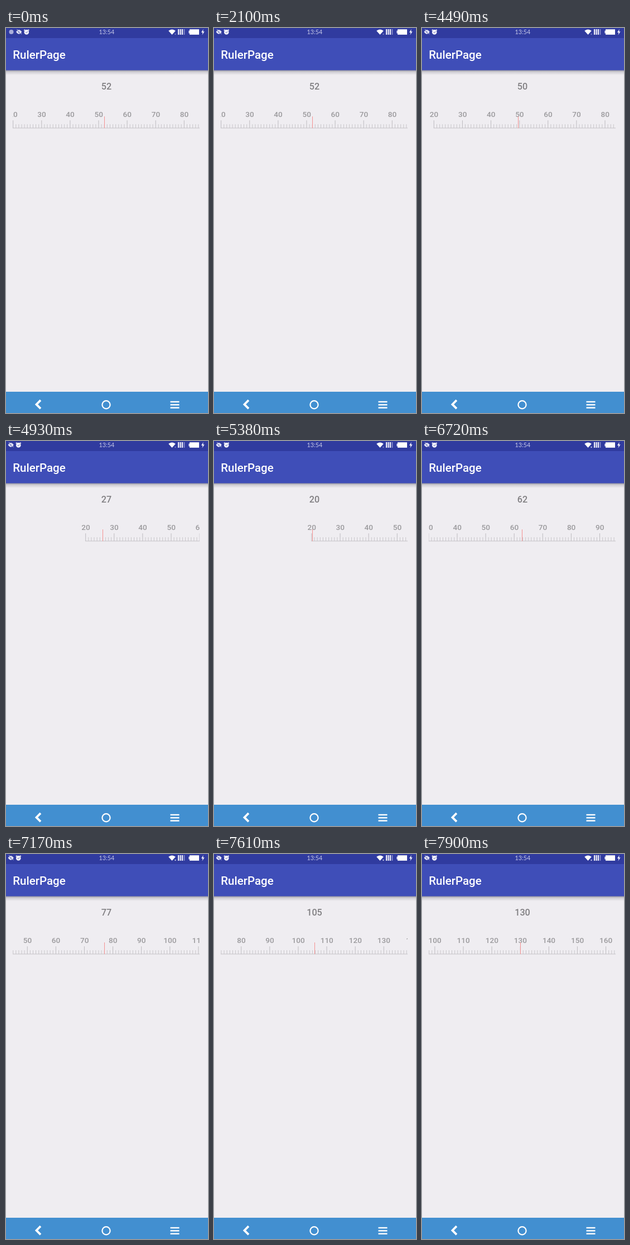
These frames come from a looping animation (362x688 px, 8000 ms). An HTML page with a canvas:

```html
<!DOCTYPE html>
<html lang="en">
<head>
<meta charset="utf-8">
<title>Ruler</title>
<style>
  html, body { margin: 0; width: 100%; height: 100%; overflow: hidden; background: #efedf1; }
  canvas { display: block; width: 362px; height: 688px; }
</style>
</head>
<body>
<canvas id="stage" width="362" height="688"></canvas>
<script>
const ctx = document.getElementById('stage').getContext('2d');
const LOOP = 8000, TICK = 146.5;
const UNIT = 5.11, CENTER = 176.2, LEFT = 12, RIGHT = 347, FIRST = 20, REST = 52;

// Swipes of the ruler, each slowing down with its own power
const SWIPES = [
  { start: 4490, span: 1100, from: 50.3, to: 20, power: 3 },
  { start: 6130, span: 1026, from: 20.9, to: 77, power: 1.57 },
  { start: 7460, span: 440, from: 84, to: 130, power: 1.5 }
];

// Scale value and pointer lead; the screen refreshes once per TICK
function pose(t) {
  const swipe = SWIPES.filter(s => t >= s.start).pop();
  if (!swipe) return { value: REST, lead: 0 };
  const { start, span, from, to, power } = swipe;
  const held = Math.floor((t - start) / TICK) * TICK;
  const left = Math.max(0, 1 - held / span) ** power;
  return {
    value: to + (from - to) * left,
    lead: Math.sign(to - from) * Math.min(4, 13 * left)
  };
}

function rect(x, y, w, h, color) {
  ctx.fillStyle = color;
  ctx.fillRect(x, y, w, h);
}

function text(str, x, y, font, color, align = 'center') {
  ctx.font = font;
  ctx.fillStyle = color;
  ctx.textAlign = align;
  ctx.fillText(str, x, y);
}

function path(points) {
  ctx.beginPath();
  points.forEach(([x, y]) => ctx.lineTo(x, y));
}

function shape(points, color) {
  path(points);
  ctx.fillStyle = color;
  ctx.fill();
}

function stroke(points, width, color) {
  path(points);
  ctx.lineWidth = width;
  ctx.strokeStyle = color;
  ctx.stroke();
}

function disc(x, y, r, color) {
  ctx.beginPath();
  ctx.arc(x, y, r, 0, 7);
  ctx.fillStyle = color;
  ctx.fill();
}

function eye(x, y) {
  ctx.beginPath();
  ctx.moveTo(x - 5, y);
  ctx.quadraticCurveTo(x, y - 7.5, x + 5, y);
  ctx.quadraticCurveTo(x, y + 7.5, x - 5, y);
  ctx.fillStyle = '#e3e4f5';
  ctx.fill();
  disc(x, y, 1.4, '#7c84c4');
  stroke([[x - 4, y - 3.6], [x + 4, y + 4.4]], .8, '#4550a6');
  stroke([[x - 3.6, y - 4.5], [x + 4.6, y + 3.7]], 1, '#eeeef9');
}

function alarm(x, y) {
  disc(x, y + .4, 4.3, '#f3f3fb');
  for (const side of [-1, 1]) {
    stroke([[x + side * 4.6, y - 2.6], [x + side * 2.6, y - 4.2]], 1.4, '#f3f3fb');
  }
  stroke([[x - 1.7, y + .4], [x - .3, y + 1.8], [x + 2, y - .8]], 1, '#5a63b2');
}

function wifi(t) {
  ctx.beginPath();
  ctx.moveTo(297.5, 12);
  ctx.lineTo(291.2, 5);
  ctx.quadraticCurveTo(297.5, 0, 303.8, 5);
  ctx.fillStyle = '#fff';
  ctx.fill();
  const busy = t >= 6130 || (t >= 1050 && t < 2100);
  shape([[302, 10.2], [305, 10.2], [303.5, 12.4]], busy ? '#ecedf8' : '#8d93cb');
}

function statusBar(t) {
  rect(0, 0, 362, 18, '#303b9f');
  const shift = t < 2100 ? 14.5 : 0;
  if (shift) disc(9.5, 7, 4, '#a9aeda');
  eye(8.7 + shift, 7);
  alarm(22.3 + shift, 7);
  text('13:54', 180.3, 11, '10.8px Lato, sans-serif', '#c6c9e8');
  wifi(t);
  for (let i = 0; i < 4; i++) rect(308 + i * 3.4, 2, 2.2, 10, i < 3 ? '#f0f0fa' : '#7f86c6');
  rect(327.3, 4.7, 2, 4.8, '#d5d7ef');
  rect(329, 2.3, 17, 9.6, '#fff');
  shape([[353.6, 2], [350, 8], [352.4, 8], [351.6, 12.6], [355.6, 6.2], [353.1, 6.2]], '#f4f4fc');
}

function appBar() {
  const g = ctx.createLinearGradient(0, 75.5, 0, 84);
  g.addColorStop(0, 'rgba(60,60,75,.48)');
  g.addColorStop(.35, 'rgba(60,60,75,.18)');
  g.addColorStop(1, 'rgba(60,60,75,0)');
  rect(0, 75, 362, 9, g);
  rect(0, 18, 362, 57.5, '#3f4eb8');
  text('RulerPage', 12.3, 55, '500 20.5px Roboto, sans-serif', '#fff', 'left');
}

function ruler({ value, lead }) {
  text(Math.round(value), 180, 109.7, '500 16.2px Roboto, sans-serif', '#807f82');
  const xOf = n => CENTER + (n - value) * UNIT;

  ctx.save();
  ctx.beginPath();
  ctx.rect(LEFT, 140, RIGHT - LEFT, 45);
  ctx.clip();
  const start = Math.max(LEFT, xOf(FIRST) - .5);
  rect(start, 178.3, RIGHT - start, 1, '#c6c4c8');
  const low = Math.max(FIRST, Math.floor(value - 36));
  for (let n = low; n < value + 38; n++) {
    const x = xOf(n), major = n % 10 === 0;
    const top = major ? 165 : 172;
    rect(x - .5, top, 1, 179 - top, major ? '#bebcc0' : '#c8c6ca');
    if (major) text(n, x + .2, 158.6, '500 13.6px Roboto, sans-serif', '#9b9a9d');
  }
  rect(Math.floor(CENTER + lead), 158, 1, 21, '#f59292');
  ctx.restore();
}

function navBar() {
  rect(0, 650, 362, 38, '#428fd0');
  stroke([[62, 665.2], [54.5, 672.7], [62, 680.2]], 3.8, '#fff');
  ctx.beginPath();
  ctx.arc(179.5, 673.2, 7.1, 0, 7);
  ctx.lineWidth = 2.2;
  ctx.stroke();
  for (let i = 0; i < 3; i++) rect(294.5, 666.8 + i * 5.3, 16, 2.4, '#fff');
}

function draw(t) {
  rect(0, 0, 362, 688, '#efedf1');
  appBar();
  statusBar(t);
  ruler(pose(t));
  navBar();
}

const origin = performance.now();
function frame() {
  draw((performance.now() - origin) % LOOP);
  requestAnimationFrame(frame);
}
frame();
</script>
</body>
</html>
```
